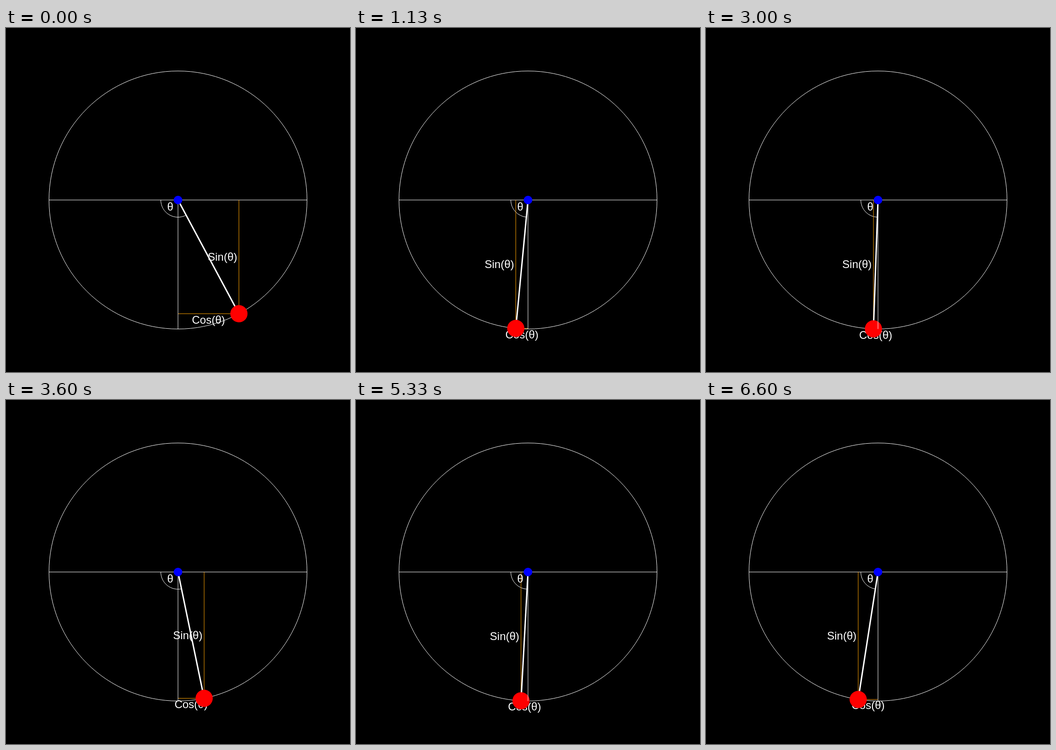
These frames come from a looping animation (748x748 px, 6670 ms). An HTML page:

```html
<!DOCTYPE html>
<html lang="en">
<head>
<meta charset="utf-8">
<title>Damped pendulum</title>
<style>
  html, body { margin: 0; width: 100%; height: 100%; overflow: hidden; background: #000; }
  svg { display: block; width: 100vw; height: 100vh; }
  .thin { fill: none; stroke: #fff; stroke-width: 1; }
  .side { stroke: #ffa500; stroke-width: 1; }
  text { fill: #fff; font: 24px "Liberation Sans", Arial, sans-serif; }
</style>
</head>
<body>
<svg viewBox="0 0 748 748">
  <circle class="thin" cx="374" cy="374" r="280.5"/>
  <path class="thin" d="M93.5 374H654.5"/>
  <path class="thin" id="arc"/>
  <path class="side" id="sinSide"/>
  <path class="side" id="cosSide"/>
  <path id="rod" stroke="#fff" stroke-width="3"/>
  <text id="sinLabel" text-anchor="end">Sin(θ)</text>
  <text id="cosLabel" text-anchor="middle">Cos(θ)</text>
  <text x="357.2" y="396.8" text-anchor="middle">θ</text>
  <circle id="bob" r="18.7" fill="#f00"/>
  <path class="thin" d="M374 374V654.5"/>
  <circle cx="374" cy="374" r="9.35" fill="#00f"/>
</svg>
<script>
const LOOP = 6670, STEP = 1000 / 15;
const CENTER = 374, LENGTH = 280.5, ARC_RADIUS = 37.4;
const byId = id => document.getElementById(id);

function setAttrs(id, attrs) {
  for (const [name, value] of Object.entries(attrs)) byId(id).setAttribute(name, value);
}

// Angle from the vertical: a lightly damped swing.
const swing = n => 0.4943 * Math.exp(-0.01 * n) * Math.cos(0.1 * n + 0.1);

function along(angle, radius) {
  return [CENTER + radius * Math.sin(angle), CENTER + radius * Math.cos(angle)];
}

function render(time) {
  // Steps last 70, 60 or 70 ms on a 10 ms clock.
  const tick = Math.floor((time % LOOP) / 10) * 10;
  const angle = swing(Math.floor((tick + 5) / STEP));
  const [x, y] = along(angle, LENGTH);
  const [ax, ay] = along(angle, ARC_RADIUS);

  setAttrs("arc", { d: `M${CENTER - ARC_RADIUS} ${CENTER}A${ARC_RADIUS} ${ARC_RADIUS} 0 0 0 ${ax} ${ay}` });
  setAttrs("rod", { d: `M${CENTER} ${CENTER}L${x} ${y}` });
  setAttrs("sinSide", { d: `M${x} ${CENTER}V${y}` });
  setAttrs("cosSide", { d: `M${CENTER} ${y}H${x}` });
  setAttrs("bob", { cx: x, cy: y });
  setAttrs("sinLabel", { x: x - 3.7, y: (CENTER + y) / 2 + 8.3 });
  setAttrs("cosLabel", { x: (CENTER + x) / 2, y: y + 21.3 });
}

const start = performance.now();
function loop() {
  render(performance.now() - start);
  requestAnimationFrame(loop);
}
loop();
</script>
</body>
</html>
```
